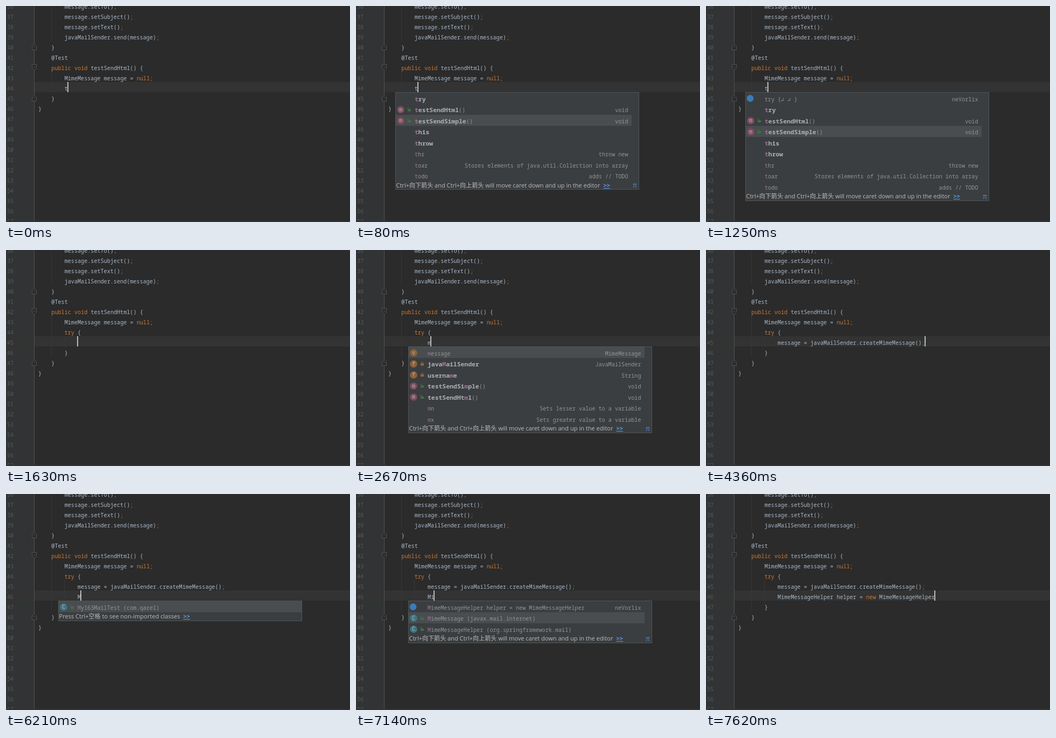
Recreate the animation shown at these times as an HTML page with a canvas. Size 639 by 401 pixels, loop 8 s.

```html
<!DOCTYPE html>
<html lang="en">
<head>
<meta charset="utf-8">
<title>Code completion</title>
<style>
html, body { margin: 0; width: 100%; height: 100%; overflow: hidden; background: #2b2b2b; }
canvas { display: block; }
</style>
</head>
<body>
<canvas id="stage" width="639" height="401"></canvas>
<script>
const ctx = document.getElementById("stage").getContext("2d");
const W = 639, H = 401, LOOP = 8000;
const LINE = 19, ROW = 20.5, PITCH = 6.09, LEFT = 60;
const MONO = '"Noto Sans Mono", "DejaVu Sans Mono", monospace';
const CODE = "10.15px " + MONO;
const BOLD = "bold 11.4px " + MONO;
const UI = '11.05px "Open Sans", "Noto Sans CJK SC", "Noto Sans CJK", sans-serif';
const TEXT = "#a9b7c6", KEYWORD = "#cc7832", SEMICOLON = "#a8683a";
const DIM = "#929394", STRONG = "#aeb0b2", HIT = "#9a7396", LINK = "#589df6";
const PLUGIN = "neVorlix";

const colX = col => LEFT + PITCH * col;
const lineTop = n => 141 + LINE * (n - 44);

function rect(x, y, w, h, color) {
  ctx.fillStyle = color;
  ctx.fillRect(x, y, w, h);
}

function text(str, x, y, color, font = CODE, align = "left") {
  ctx.font = font;
  ctx.textAlign = align;
  ctx.fillStyle = color;
  ctx.fillText(str, x, y);
  return x + ctx.measureText(str).width;
}

function disc(x, y, r, color) {
  ctx.fillStyle = color;
  ctx.beginPath();
  ctx.arc(x, y, r, 0, 2 * Math.PI);
  ctx.fill();
}

// ---- editor ----

const head = [
  "        message.setTo();",
  "        message.setSubject();",
  "        message.setText();",
  "        javaMailSender.send(message);",
  "    }",
  "    @Test",
  "    public void testSendHtml() {",
  "        MimeMessage message = null;"
];
const tryBlock = (...body) => [
  "        try {", ...body.map(s => " ".repeat(12) + s), "        }", "    }", "}"
];

function tokenColor(token) {
  if (token === ";") return SEMICOLON;
  return /^(public|void|null|try|new)$/.test(token) ? KEYWORD : TEXT;
}

function codeLine(str, y) {
  for (const m of str.matchAll(/;|[^\s;]+/g)) {
    text(m[0], colX(m.index), y, tokenColor(m[0]));
  }
}

function foldMark(n, up) {
  const mid = lineTop(n) + 11, s = up ? -1 : 1, x = 52.5;
  ctx.beginPath();
  ctx.moveTo(x - 4, mid - 5.5 * s);
  ctx.lineTo(x + 4, mid - 5.5 * s);
  ctx.lineTo(x + 4, mid + 1.5 * s);
  ctx.lineTo(x, mid + 5.5 * s);
  ctx.lineTo(x - 4, mid + 1.5 * s);
  ctx.closePath();
  ctx.fillStyle = "#2b2b2b";
  ctx.fill();
  ctx.strokeStyle = "#505254";
  ctx.lineWidth = 1;
  ctx.stroke();
  rect(x - 1.5, mid - 1, 3, 1, "#505254");
}

function guide(col, from, to) {
  rect(Math.floor(colX(col)), lineTop(from), 1, (to - from) * LINE, "#363738");
}

function editor(tail, line, col, caretOn) {
  const last = 44 + tail.length - 1;
  rect(0, 0, W, H, "#2b2b2b");
  rect(0, 0, 52, H, "#313335");
  rect(0, lineTop(line), W, LINE, "#323332");
  rect(52, 0, 1, H, "#515253");
  guide(4, 36, 40);
  guide(4, 43, last - 1);
  if (tail.length > 3) guide(8, 45, last - 2);
  for (let n = 36; n <= 57; n++) text(n, 2, lineTop(n) + 15.6, "#56595c");
  foldMark(40, true);
  foldMark(42, false);
  foldMark(last - 1, true);
  head.concat(tail).forEach((s, i) => codeLine(s, lineTop(36 + i) + 15.6));
  if (caretOn) rect(Math.floor(colX(col) - 0.8), lineTop(line), 2, LINE, "#bbbbbb");
  rect(0, 399, W, 2, "#313335");
}

// ---- completion popup ----

const iconColors = { m: "#7d4c5e", f: "#8b6136", v: "#8b6136", C: "#3c7688" };

function icon(kind, x, y) {
  if (kind === "ai") return disc(x - 1, y - 0.5, 6.4, "#3c7ab8");
  disc(x, y, 6.8, iconColors[kind]);
  text(kind, x, y + 3.2, "#b9aeac", "10px " + MONO, "center");
}

function lock(x, y, open) {
  const color = open ? "#41703f" : "#9a6538";
  rect(x - 3, y - 1, 6, 4, color);
  ctx.strokeStyle = color;
  ctx.lineWidth = 1;
  ctx.beginPath();
  ctx.arc(x - (open ? 2 : 0), y - 1.5, 2, Math.PI, 2 * Math.PI);
  ctx.stroke();
}

// kind, label, index of the matched letter, right-hand note, bold
const item = (kind, label, hit, note = "", bold = false) => ({ kind, label, hit, note, bold });

function popupRow(r, x, y, right) {
  const base = y + 15.7, mid = y + 11;
  if (r.kind) icon(r.kind, x + 10, mid);
  if (["m", "f", "C"].includes(r.kind)) lock(x + 26, mid, r.kind !== "f");
  const font = r.bold ? BOLD : CODE, color = r.bold ? STRONG : DIM;
  const name = r.bold ? r.label.replace("()", "") : r.label;
  let tx = x + 36;
  if (r.hit > 0) tx = text(name.slice(0, r.hit), tx, base, color, font);
  if (r.hit >= 0) tx = text(name[r.hit], tx, base, HIT, font);
  tx = text(name.slice(r.hit + 1), tx, base, color, font);
  text(r.label.slice(name.length), tx, base, DIM);
  text(r.note, right - 6.5, base, DIM, CODE, "right");
}

const arrowHint = "Ctrl+向下箭头 and Ctrl+向上箭头 will move caret down and up in the editor";
const classHint = "Press Ctrl+空格 to see non-imported classes";

function popup({ x, y, rows, sel, hint = arrowHint }) {
  const w = 453, listH = rows.length * ROW, top = y + 1;
  const h = Math.round(listH + 17.4);
  const right = x + w - (hint === classHint ? 1 : 14);
  rect(x, y, w, h, "#515457");
  rect(x + 1, y + 1, w - 2, h - 2, "#3b3e40");
  rect(x + 1, top + sel * ROW, right - x - 1, ROW, "#4a4d4f");
  rows.forEach((r, i) => popupRow(r, x, top + i * ROW, right));
  const base = top + listH + 11.5;
  const end = text(hint, x + 1.5, base, "#bbbbbb", UI);
  const linkEnd = text(">>", end + 6, base, LINK, "bold " + UI);
  rect(end + 6, Math.round(base) + 1, linkEnd - end - 6, 1, LINK);
  if (hint === arrowHint) text("π", x + w - 8, base + 0.5, "#4f8bd6", '13px "Noto Serif", serif', "center");
}

const tRows = [
  item("", "try", 0, "", true),
  item("m", "testSendHtml()", 0, "void", true),
  item("m", "testSendSimple()", 0, "void", true),
  item("", "this", 0, "", true),
  item("", "throw", 0, "", true),
  item("", "thr", 0, "throw new"),
  item("", "toar", 0, "Stores elements of java.util.Collection into array"),
  item("", "todo", 0, "adds // TODO")
];
const mRows = [
  item("v", "message", 0, "MimeMessage"),
  item("f", "javaMailSender", 4, "JavaMailSender", true),
  item("f", "username", 6, "String", true),
  item("m", "testSendSimple()", 10, "void", true),
  item("m", "testSendHtml()", 10, "void", true),
  item("", "mn", 0, "Sets lesser value to a variable"),
  item("", "mx", 0, "Sets greater value to a variable")
];
const ownClass = item("C", "My163MailTest (com.qarel)", 0);
const mimeRows = [
  item("C", "MimeMessage (javax.mail.internet)", 0),
  item("C", "MimeMessageHelper (org.springframework.mail)", 0)
];

const assign = "message = javaMailSender.createMimeMessage();";
const helper = "MimeMessageHelper helper = new MimeMessageHelper";
const aiRow = (label, hit) => item("ai", label, hit, PLUGIN);

const typedT = ["        t", "    }", "}"];
const tList = { x: 73, y: 160, rows: tRows, sel: 2 };
const tListAi = { ...tList, rows: [aiRow("try {↲ ↲ }", -1), ...tRows], sel: 3 };
const mList = { x: 97, y: 179, rows: mRows, sel: 0 };
const mListAi = { ...mList, rows: [aiRow(assign, 0), ...mRows], sel: 1 };
const classList = { x: 97, y: 198, rows: [ownClass], sel: 0, hint: classHint };
const mimeList = { x: 97, y: 198, rows: [...mimeRows, ownClass], sel: 0 };
const mimeListAi = { ...mimeList, rows: [aiRow(helper, 0), ...mimeRows], sel: 1 };

// ---- timeline: start, lines, caret line, caret column, caret on, popup ----

const scenes = [
  [0, typedT, 44, 9, true],
  [80, typedT, 44, 9, true, tList],
  [630, typedT, 44, 9, true, tListAi],
  [1000, typedT, 44, 9, false, tListAi],
  [1250, typedT, 44, 9, true, tListAi],
  [1630, tryBlock(""), 45, 12, true],
  [2490, tryBlock("m"), 45, 13, true],
  [2670, tryBlock("m"), 45, 13, true, mList],
  [3280, tryBlock("m"), 45, 13, false, mListAi],
  [4360, tryBlock(assign), 45, 57, true],
  [5430, tryBlock(assign, ""), 46, 12, true],
  [6210, tryBlock(assign, "M"), 46, 13, true, classList],
  [6590, tryBlock(assign, "Mi"), 46, 14, true, classList],
  [6690, tryBlock(assign, "Mi"), 46, 14, true, mimeList],
  [7140, tryBlock(assign, "Mi"), 46, 14, true, mimeListAi],
  [7620, tryBlock(assign, helper), 46, 60, true]
];

const startTime = performance.now();

function draw() {
  const t = (performance.now() - startTime) % LOOP;
  const [, lines, line, col, caretOn, list] = scenes.findLast(s => s[0] <= t);
  editor(lines, line, col, caretOn);
  if (list) popup(list);
  requestAnimationFrame(draw);
}
draw();
</script>
</body>
</html>
```
